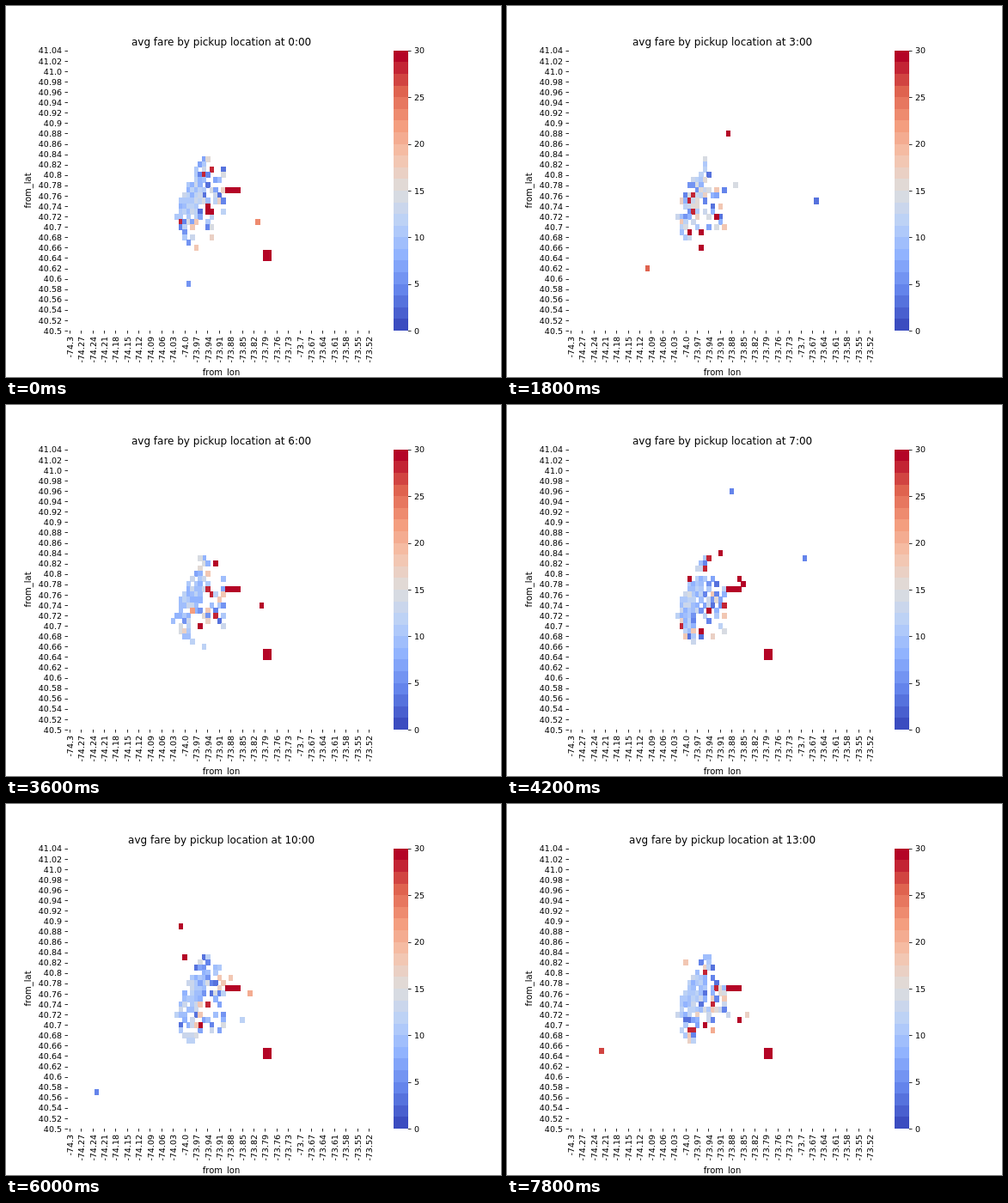
Animation, 576 px wide and 432 px high, one loop 8 s. Source, as an HTML page with a canvas:

```html
<!DOCTYPE html>
<html lang="en">
<head>
<meta charset="utf-8">
<title>Average fare by pickup location</title>
<style>
html, body { margin: 0; overflow: hidden; background: #fff; }
canvas { display: block; }
</style>
</head>
<body>
<canvas id="stage" width="576" height="432"></canvas>
<script>
const ctx = document.getElementById('stage').getContext('2d');
const LOOP = 8000, HOUR = 600;
const LEFT = 72, TOP = 51.84, BOTTOM = 378, CELL_W = 4.464, CELL_H = 6.04;
const MID_X = 250.56, MID_Y = 214.9, BAR_X = 451, BAR_RIGHT = 468;
const MAX_FARE = 30, BANDS = 24;
const RAMP = ['#3b4cc0', '#6282ea', '#8db0fe', '#b8d0f9', '#dddddd',
  '#f5c4ad', '#f49a7b', '#de604d', '#b40426'];

// The few pickups far from the city: hour, column, row, fare.
const REMOTE = [
  [0, 31, 45, 5], [0, 49, 33, 23], [3, 20, 42, 25], [3, 41, 16, 30],
  [3, 64, 29, 3], [5, 57, 35, 3], [7, 42, 8, 4], [7, 61, 21, 4],
  [9, 40, 12, 8], [10, 29, 15, 30], [10, 7, 47, 4], [13, 8, 39, 27]
];

const clamp = (v, lo, hi) => Math.max(lo, Math.min(hi, v));
const barY = fare => BOTTOM - fare / MAX_FARE * (BOTTOM - TOP);

function bandColor(band) {
  const pos = band / (BANDS - 1) * (RAMP.length - 1);
  const i = Math.min(Math.floor(pos), RAMP.length - 2);
  const channel = (hex, k) => parseInt(hex.slice(1 + 2 * k, 3 + 2 * k), 16);
  const mix = k => Math.round(channel(RAMP[i], k) +
    (channel(RAMP[i + 1], k) - channel(RAMP[i], k)) * (pos - i));
  return `rgb(${mix(0)},${mix(1)},${mix(2)})`;
}

function random(...seeds) {
  let h = 2166136261;
  for (const s of seeds) {
    h = Math.imul(h ^ (s + 101), 16777619);
    h = Math.imul(h ^ (h >>> 15), 2246822519);
  }
  return ((h ^ (h >>> 13)) >>> 0) / 4294967296;
}

// Cells cover every pixel they touch.
function cell(col, row, fare) {
  const x = Math.floor(LEFT + col * CELL_W), y = Math.floor(TOP + (row - 0.5) * CELL_H);
  ctx.fillStyle = bandColor(clamp(Math.floor(fare / MAX_FARE * BANDS), 0, BANDS - 1));
  ctx.fillRect(x, y, Math.ceil(LEFT + (col + 1) * CELL_W) - x,
    Math.ceil(TOP + (row + 0.5) * CELL_H) - y);
}

function text(str, x, y, align, size = 10, angle = 0) {
  ctx.save();
  ctx.translate(x, y);
  ctx.rotate(angle);
  ctx.font = size + 'px "DejaVu Sans", sans-serif';
  ctx.textAlign = align;
  ctx.fillStyle = '#000';
  ctx.fillText(str, 0, 0);
  ctx.restore();
}

function tick(x, y, w, h) {
  ctx.fillStyle = 'rgba(0,0,0,.8)';
  ctx.fillRect(x, y, w, h);
}

const degrees = v => v.toFixed(2).replace(/0$/, '');

function drawAxes() {
  for (let i = 0; i < 28; i++) {
    const y = TOP + i * 2 * CELL_H;
    tick(68.5, Math.round(y), 3.5, 1);
    text(degrees(41.04 - i * 0.02), 65, Math.round(y + 3.6), 'right', 9.5);
  }
  for (let i = 0; i < 27; i++) {
    const x = LEFT + (i * 3 + 0.5) * CELL_W;
    tick(Math.floor(x), BOTTOM, 1, 3.5);
    text(degrees(-74.3 + i * 0.03), Math.round(x + 3.6), 385, 'right', 9.5, -Math.PI / 2);
  }
  text('from_lon', MID_X, 430, 'center');
  text('from_lat', 29, MID_Y, 'center', 10, -Math.PI / 2);
}

function drawColorBar() {
  for (let band = 0; band < BANDS; band++) {
    const y = Math.round(barY((band + 1) / BANDS * MAX_FARE));
    ctx.fillStyle = bandColor(band);
    ctx.fillRect(BAR_X, y, BAR_RIGHT - BAR_X,
      Math.round(barY(band / BANDS * MAX_FARE)) - y);
  }
  for (let fare = 0; fare <= MAX_FARE; fare += 5) {
    const y = barY(fare);
    tick(BAR_RIGHT, Math.round(y), 3.5, 1);
    text(fare, 475, Math.round(y + 3.6), 'left', 9.5);
  }
}

// A slanted dense core with a thinner fringe to its right.
function drawCity(hour, night) {
  for (let row = 21; row <= 37; row++) {
    const d = Math.abs(32 - row);
    const first = Math.round(28.3 + d * 0.3 + d * d * 0.03);
    const last = first + Math.round(5.5 - Math.abs(row - 29) * 0.4) - 1;
    const central = row > 24 && row < 33;
    for (let col = first; col <= 40; col++) {
      const core = central && col <= last;
      const fringe = clamp(0.6 - Math.abs(row - 29) * 0.08, 0, 0.5);
      const density = core ? 0.96 : col <= last ? 0.75 : fringe;
      if (random(hour, row, col) > density - (night ? 0.08 : 0)) continue;
      const spread = core ? (night ? 12 : 6) : 16;
      const costly = random(row, col, hour, 3) < (night ? 0.08 : core ? 0 : 0.05);
      cell(col, row, costly ? 28 : 10.5 + (random(col, hour, row, 7) - 0.5) * spread);
    }
  }
}

// Single pickups scattered loosely around the city.
function drawStrays(hour) {
  for (let i = 0; i < 7; i++) {
    const spread = k => random(hour, i, k) + random(hour, i, k + 1) - 1;
    cell(Math.round(38 + spread(1) * 13), Math.round(30 + spread(3) * 13),
      random(hour, i, 5) < 0.35 ? 30 : 4 + random(hour, i, 6) * 20);
  }
  for (const [at, ...pickup] of REMOTE) if (at === hour) cell(...pickup);
}

function drawAirports(night) {
  if (night) return;
  for (let col = 41; col <= 44; col++) cell(col, 27, MAX_FARE);
  for (let i = 0; i < 4; i++) cell(51 + i % 2, 39 + (i >> 1), MAX_FARE);
}

function draw(hour) {
  const night = hour > 1 && hour < 6;
  ctx.fillStyle = '#fff';
  ctx.fillRect(0, 0, 576, 432);
  drawCity(hour, night);
  drawStrays(hour);
  drawAirports(night && hour < 5);
  drawAxes();
  drawColorBar();
  text(`avg fare by pickup location at ${hour}:00`, MID_X, 46, 'center', 12);
}

let shown = -1;
function animate() {
  const hour = Math.floor(performance.now() % LOOP / HOUR);
  if (hour !== shown) draw(shown = hour);
  requestAnimationFrame(animate);
}
animate();
</script>
</body>
</html>
```
